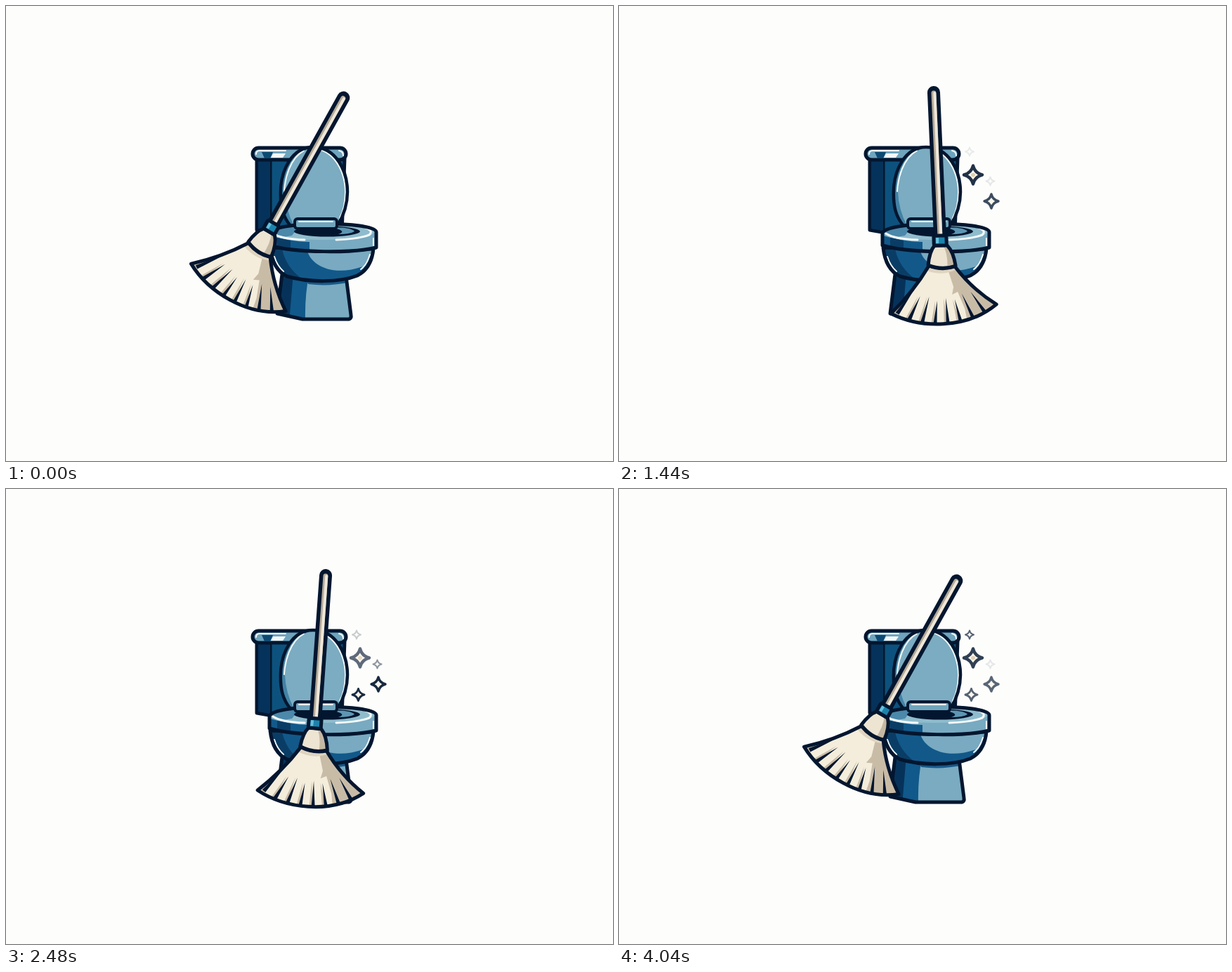
An HTML page for the animation above (4080 ms loop, 864 by 648 pixels).

```html
<!DOCTYPE html>
<html lang="en">
<head>
<meta charset="utf-8">
<title>Bathroom cleaning</title>
<style>
html, body { margin: 0; width: 100%; height: 100%; overflow: hidden; background: #fdfdfc; }
svg { display: block; width: 864px; height: 648px; }
.ink { stroke: #03162f; stroke-width: 5; stroke-linejoin: round; stroke-linecap: round; }
.shine { fill: none; stroke: #f4fafa; stroke-width: 2; stroke-linecap: round; }
.line { fill: none; }
</style>
</head>
<body>
<svg viewBox="0 0 864 648">
  <defs>
    <path id="lidShape" d="M437 201C470 201 486 235 486 265C486 286 479 301 472 313H405C394 300 390 285 391 262C392 235 406 201 437 201Z"/>
    <path id="bowlShape" d="M376 344C378 363 385 378 400 385C430 394 475 394 500 384C514 377 521 365 523 346Z"/>
    <path id="footShape" d="M393 382L386 438L422 446L488 446Q492 445 491 440L484 385Z"/>
    <path id="rimShape" d="M375 324C375 306 527 306 527 322V344C495 352 412 352 375 341Z"/>
    <path id="fanShape" d="M441 370Q419 407 387 438C428 459 494 461 537 425Q502 403 478 371Q460 377 441 370Z"/>
    <path id="neckShape" d="M449 341C443 348 441 357 440 369Q460 377 479 370C477 357 474 348 467 341Z"/>
    <clipPath id="lidClip"><use href="#lidShape"/></clipPath>
    <clipPath id="bowlClip"><use href="#bowlShape"/></clipPath>
    <clipPath id="footClip"><use href="#footShape"/></clipPath>
    <clipPath id="rimClip"><use href="#rimShape"/></clipPath>
    <clipPath id="fanClip"><use href="#fanShape"/></clipPath>
    <clipPath id="neckClip"><use href="#neckShape"/></clipPath>
    <path id="star" d="M0-1Q.2-.2 1 0Q.2.2 0 1Q-.2.2-1 0Q-.2-.2 0-1Z" fill="#fbf5e8" stroke="#03162f" stroke-width=".34" stroke-linejoin="round"/>
  </defs>

  <!-- tank -->
  <path class="ink" fill="#0d527e" d="M357 217V319L380 323H478L482 217Z"/>
  <path fill="#05325a" d="M359 219H375V320L359 317Z"/>
  <path class="ink line" d="M377 220V320" style="stroke-width:3"/>
  <rect class="ink" x="351" y="202" width="133" height="17" rx="8.5" fill="#6fa4bd"/>
  <path fill="#0d4a73" d="M364 208H380L376 217H368Z"/>
  <path fill="#f4fafa" d="M380 210H398L394 216H377Z"/>
  <path class="shine" d="M356 211Q356 206 361 206H398M474 206Q480 207 480 213"/>

  <!-- raised lid -->
  <use href="#lidShape" fill="#7bacc2"/>
  <g clip-path="url(#lidClip)">
    <path fill="#4282a5" d="M437 200C408 212 396 238 397 265Q398 290 410 313H380V200Z"/>
    <path class="shine" d="M424 206C404 217 397 245 396 264"/>
    <path class="shine" d="M448 205C472 213 483 242 483 265Q483 287 475 302"/>
  </g>
  <use href="#lidShape" class="ink line" style="stroke-width:4.5"/>

  <!-- foot -->
  <use href="#footShape" fill="#7aabc1"/>
  <g clip-path="url(#footClip)">
    <path fill="#10598a" d="M380 380H432Q425 410 426 450H380Z"/>
    <path fill="#06325a" d="M380 380H409L403 450H380Z"/>
    <path fill="#17598a" d="M425 385H490V393Q460 400 430 396Z"/>
  </g>
  <use href="#footShape" class="ink line"/>

  <!-- bowl -->
  <use href="#bowlShape" fill="#12598a"/>
  <g clip-path="url(#bowlClip)">
    <path fill="#0a3d66" d="M370 340H392Q396 371 423 390H370Z"/>
    <path fill="#79aac1" d="M428 345C432 370 465 386 508 371L530 340Z"/>
    <path class="shine" d="M382 357Q386 370 395 378M518 354Q514 368 505 375"/>
  </g>
  <use href="#bowlShape" class="ink line"/>

  <!-- seat -->
  <use href="#rimShape" fill="#78aac1"/>
  <g clip-path="url(#rimClip)">
    <path fill="#12598a" d="M373 326Q400 335 432 336V352H373Z"/>
    <path fill="#0a3d66" d="M386 330L405 334V352H386Z"/>
    <path fill="#8fbccd" d="M376 323C380 308 523 308 525 322C520 336 386 337 376 323Z"/>
    <path fill="#4b88aa" d="M391 314H417L407 327L390 330Q380 326 378 322Z"/>
    <path class="shine" style="stroke-width:3" d="M380 324Q392 332 425 333M510 315Q524 320 517 326Q502 332 470 333"/>
    <path class="shine" d="M523 331V341"/>
  </g>
  <ellipse cx="457" cy="321" rx="47" ry="7.5" fill="#03162f"/>
  <path fill="#5d96b3" d="M461 315Q492 315 496 321Q490 325 473 325Q488 320 461 315Z"/>
  <use href="#rimShape" class="ink line"/>
  <rect class="ink" x="411" y="303" width="60" height="14" rx="4" fill="#70a5bd" style="stroke-width:4"/>
  <path class="shine" d="M417 307H465"/>

  <g id="stars"></g>

  <!-- broom, drawn almost upright -->
  <g id="broom">
    <path class="ink line" d="M448 123L457 330" style="stroke-width:18"/>
    <path class="line" d="M448 124L457 330" stroke="#b4a997" stroke-width="7" stroke-linecap="round"/>
    <path class="line" d="M449.3 124L458.3 330" stroke="#eee7da" stroke-width="4" stroke-linecap="round"/>
    <use href="#fanShape" fill="#f4eddb"/>
    <g clip-path="url(#fanClip)">
      <path fill="#c9bca7" d="M467 372L476 400L474 411L482 407L492 431L497 455L545 430L478 365Z"/>
      <path fill="#dfd4bf" d="M441 370Q460 382 479 370V376Q460 385 438 377Z"/>
      <path id="shade" fill="#c9bca7" transform="translate(-3 0)"/>
      <path id="gaps" fill="#03162f"/>
    </g>
    <use href="#fanShape" class="ink line"/>
    <use href="#neckShape" fill="#ede4d2"/>
    <path clip-path="url(#neckClip)" fill="#c5b8a3" d="M461 340Q469 355 467 377H482V340Z"/>
    <use href="#neckShape" class="ink line"/>
    <rect class="ink" x="448" y="327" width="18" height="14" rx="2" fill="#1c83ac" transform="rotate(-2 457 334)"/>
    <path fill="#68c0dc" d="M451 330H455V338H451Z"/>
  </g>
</svg>
<script>
const LOOP = 4080, STEP = 40, SWING = 2000, FAINT = .08;
const get = id => document.getElementById(id);

// Gaps between bristles: eight thin wedges spread evenly around the neck
let wedges = '';
for (let i = 0; i < 8; i++) {
  const at = (radius, degrees) => {
    const a = degrees * Math.PI / 180;
    return `${459 + radius * Math.sin(a)} ${348 + radius * Math.cos(a)}`;
  };
  const middle = 10 * i - 35, tip = 68 + 4 * (i % 2);
  wedges += `M${at(110, middle - 1.5)}L${at(tip, middle)}L${at(110, middle + 1.5)}Z`;
}
for (const id of ['shade', 'gaps']) get(id).setAttribute('d', wedges);

// Each star waits for its start, then fades up and down, taking "fade" ms each way
const stars = [
  { x: 499, y: 207.5, r: 6, start: 320, fade: 560 },
  { x: 504, y: 240.5, r: 13, start: 920, fade: 600 },
  { x: 528.5, y: 249.5, r: 6, start: 120, fade: 655 },
  { x: 530, y: 278, r: 10, start: 650, fade: 630 },
  { x: 501.5, y: 293, r: 8.5, start: 1720, fade: 690 }
];
get('stars').innerHTML = stars.map(({ x, y, r }) =>
  `<g transform="translate(${x} ${y}) scale(${r})"><use href="#star"/>` +
  (r > 12 ? '<circle r=".22" fill="#dcc9a8"/>' : '') + '</g>').join('');

function twinkle({ start, fade }, t) {
  if (t < start) return 0;
  const phase = (t - start) / fade % 2;
  return FAINT + (1 - FAINT) * (1 - Math.abs(1 - phase));
}

function draw(now) {
  const t = Math.floor(now % LOOP / STEP) * STEP;
  const angle = 2.5 + 26.6 * Math.cos(2 * Math.PI * Math.min(t, 2 * SWING) / SWING);
  get('broom').setAttribute('transform', `rotate(${angle + 2.45} 450.7 184)`);
  stars.forEach((s, i) => get('stars').children[i].setAttribute('opacity', twinkle(s, t)));
}

const begin = performance.now();
function tick() {
  draw(performance.now() - begin);
  requestAnimationFrame(tick);
}
tick();
</script>
</body>
</html>
```
